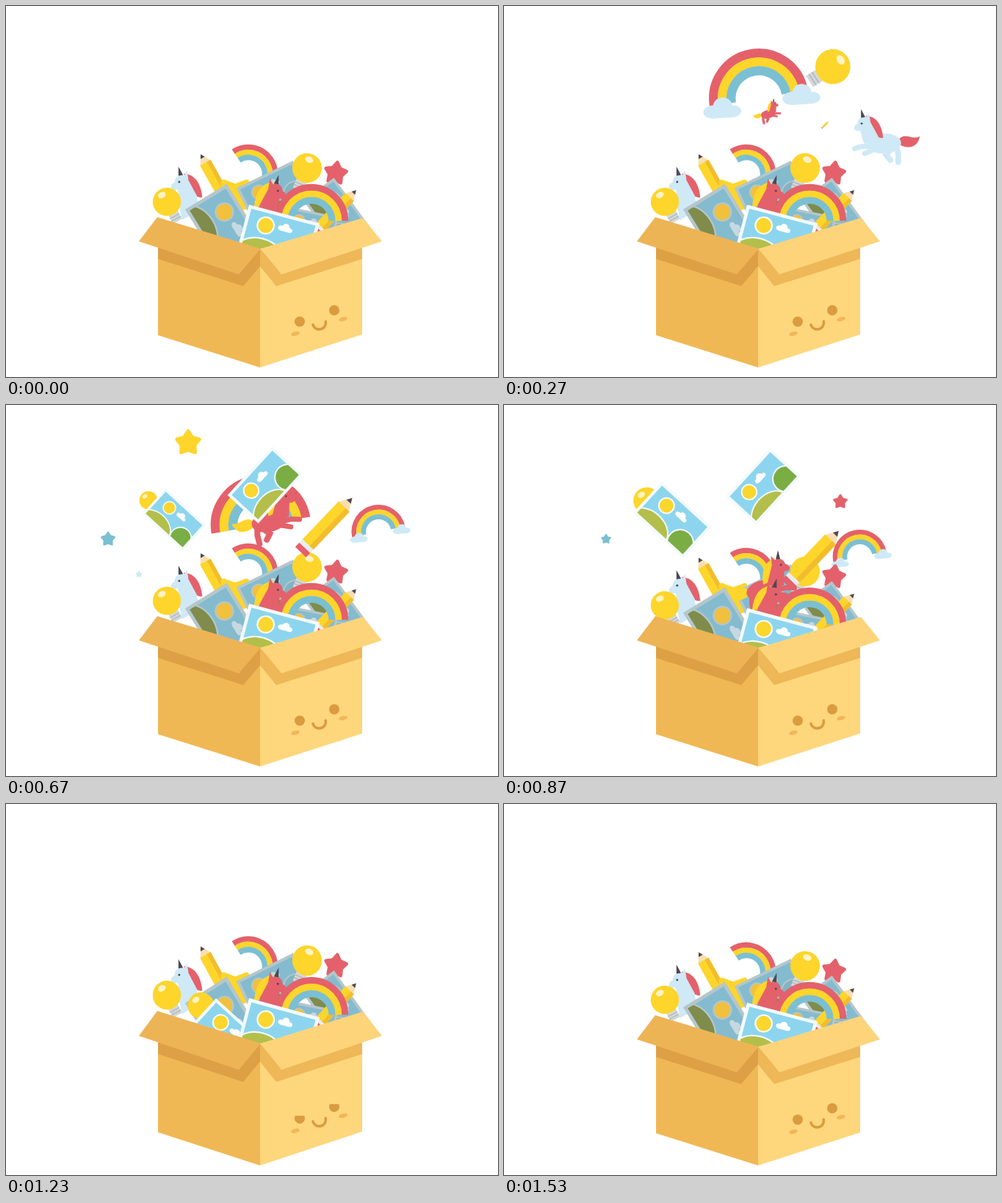
An HTML page with a canvas for the animation above (1560 ms loop, 670 by 506 pixels).

```html
<!DOCTYPE html>
<html lang="en">
<head>
<meta charset="utf-8">
<title>Box of ideas</title>
<style>
  html, body { margin: 0; width: 100%; height: 100%; overflow: hidden; background: #fff; }
  canvas { display: block; }
</style>
</head>
<body>
<canvas id="stage" width="670" height="506"></canvas>
<script>
const ctx = document.getElementById('stage').getContext('2d');
const LOOP = 1560, GROW = 250, FALL = 480;
const MOUTH = { x: 347, y: 316 }, FLOOR = 493;
const RED = '#e4616b', YELLOW = '#fdd52b', BLUE = '#7bbfd3', PALE = '#cfe9f6', DARK = '#4d4a55';
const BRIGHT = { frame: '#f4fafb', sky: '#8dd5ee', sun: '#fbd62c', cloud: '#fff', hill: '#b3bf4a', tree: '#7aae45' };
const DULL = { frame: '#b5c6cb', sky: '#84bbcf', sun: '#f1c03c', cloud: '#c6d9e0', hill: '#7f8c4c', tree: '#84b3c2' };

// ---- drawing helpers ----
function poly(color, ...p) {
  ctx.beginPath();
  for (let i = 0; i < p.length; i += 2) ctx.lineTo(p[i], p[i + 1]);
  ctx.closePath();
  ctx.fillStyle = color;
  ctx.fill();
}

function oval(color, x, y, rx, ry = rx, turn = 0) {
  ctx.beginPath();
  ctx.ellipse(x, y, rx, ry, turn, 0, 7);
  ctx.fillStyle = color;
  ctx.fill();
}

function rect(color, x, y, w, h) {
  ctx.fillStyle = color;
  ctx.fillRect(x, y, w, h);
}

function line(color, width, ...p) {
  ctx.beginPath();
  for (let i = 0; i < p.length; i += 2) ctx.lineTo(p[i], p[i + 1]);
  ctx.lineWidth = width;
  ctx.strokeStyle = color;
  ctx.stroke();
}

function put(draw, x, y, scale = 1, turn = 0) {
  ctx.save();
  ctx.translate(x, y);
  ctx.rotate(turn);
  ctx.scale(scale, scale);
  draw();
  ctx.restore();
}

const mirrored = draw => () => { ctx.scale(-1, 1); draw(); };

// ---- toys ----
function cloud(color = PALE) {
  oval(color, -13, 3, 13, 9);
  oval(color, 1, -4, 13, 12);
  oval(color, 15, 4, 11, 8);
  rect(color, -14, 2, 30, 10);
}

const rainbow = clouds => () => {
  [RED, YELLOW, BLUE].forEach((color, i) => {
    ctx.beginPath();
    ctx.arc(0, 0, 62 - 12 * i, Math.PI, 2 * Math.PI);
    ctx.lineWidth = 12.5;
    ctx.strokeStyle = color;
    ctx.stroke();
  });
  if (clouds > 0) for (const x of [-52, 58]) put(cloud, x, 6, clouds, .1);
};

const star = color => () => {
  ctx.beginPath();
  for (let i = 0; i < 10; i++) {
    const r = i % 2 ? .52 : .88, a = i * Math.PI / 5 - Math.PI / 2;
    ctx.lineTo(r * Math.cos(a), r * Math.sin(a));
  }
  ctx.closePath();
  ctx.lineJoin = 'round';
  ctx.lineWidth = .26;
  ctx.fillStyle = ctx.strokeStyle = color;
  ctx.fill();
  ctx.stroke();
};

function bulb() {
  rect('#d3d9da', -9, 18, 18, 20);
  for (const y of [28, 33]) line('#b4bdc0', 2, -9, y, 9, y);
  oval(YELLOW, 0, 0, 24);
  oval('#fff3c4', -2, -14, 7, 5);
}

function pencil() {
  poly('#f8deb0', 33, -10, 50, 0, 33, 10);
  poly(DARK, 43, -4, 50, 0, 43, 4);
  rect(YELLOW, -36, -10, 70, 20);
  rect('#f2bd2d', -36, 3, 70, 7);
  rect('#e8edef', -42, -10, 6, 20);
  rect(RED, -50, -10, 8, 20);
}

const photo = look => () => {
  const edged = (color, x, y, rx, ry) => {
    oval(look.frame, x, y, rx + 2, ry + 2);
    oval(color, x, y, rx, ry);
  };
  rect(look.frame, -46, -29, 92, 58);
  ctx.beginPath();
  ctx.rect(-42, -25, 84, 50);
  ctx.clip();
  rect(look.sky, -42, -25, 84, 50);
  edged(look.sun, -19, -9, 9.5, 9.5);
  put(() => cloud(look.cloud), 6, -12, .36);
  edged(look.tree, 29, 16, 17, 17);
  edged(look.hill, -18, 30, 30, 21);
};

const head = (coat, mane) => () => {
  ctx.beginPath();
  ctx.moveTo(3, -11);
  ctx.quadraticCurveTo(24, -9, 27, 20);
  ctx.quadraticCurveTo(17, 22, 6, 2);
  ctx.fillStyle = mane;
  ctx.fill();
  poly(coat, -7, 4, 7, -6, 20, 18, 20, 30, 0, 28);
  oval(coat, 0, 0, 9);
  oval(coat, -7, 5, 7, 5, -.4);
  poly(coat, 2, -6, 7, -15, 9, -3);
  poly(DARK, -4, -8, -4, -20, 2, -9);
  oval(DARK, -3, 0, 1.4);
};

const unicorn = (coat, mane) => () => {
  ctx.beginPath();
  ctx.moveTo(22, 2);
  ctx.bezierCurveTo(32, -12, 42, 2, 53, -4);
  ctx.bezierCurveTo(50, 14, 34, 14, 22, 6);
  ctx.fillStyle = mane;
  ctx.fill();
  ctx.lineCap = 'round';
  line(coat, 7, -14, 10, -28, 10, -38, 13);
  line(coat, 7, -10, 14, -24, 20);
  line(coat, 8, 16, 10, 6, 22, 12, 29);
  line(coat, 8, 20, 8, 23, 20, 23, 32);
  oval(coat, 3, 6, 24, 14, -.05);
  put(head(coat, mane), -25, -22);
};

function box(lid) {
  poly('#f0b854', 207, 300, 346, 331, 346, 493, 207, 449);
  poly('#fed67c', 346, 331, 485, 300, 485, 448, 346, 493);
  poly('#dea045', 207, 329, 317, 364, 346, 331, 346, 355, 323, 382, 207, 345);
  poly('#eeb757', 485, 329, 375, 364, 346, 331, 346, 355, 368, 382, 485, 345);
  poly('#edb456', 206, 288, 347, 331, 317, 366, 181, 321);
  poly('#fdd47a', 486, 289, 512, 321, 375, 366, 347, 331);

  const top = Math.asin(lid - 1);
  for (const [x, y] of [[400, 430.5], [447, 415]]) {
    ctx.beginPath();
    ctx.arc(x, y, 7, top, Math.PI - top);
    ctx.fillStyle = '#db9b40';
    ctx.fill();
    oval('#f2b65a', x + (x < 420 ? -6 : 12), y + (x < 420 ? 16.5 : 12), 6, 2.8, -.25);
  }
  ctx.beginPath();
  ctx.arc(426.5, 432, 9, -.2, Math.PI - .3);
  ctx.lineWidth = 3.5;
  ctx.lineCap = 'round';
  ctx.strokeStyle = '#db9b40';
  ctx.stroke();
}

// ---- motion ----
const pulse = (t, from, to) => t > from && t < to ? Math.sin(Math.PI * (t - from) / (to - from)) : 0;

// The box is squashed by the landing toys, then springs back with a dying swing.
function stretchAt(t) {
  const s = t - 930;
  return s < 0 ? 1 : 1 - .055 * Math.exp(-s / 440) * Math.sin(Math.PI * s / 200);
}

function render(t) {
  // A toy grows where it hangs, then drops faster and faster towards the mouth of the box.
  function toss(draw, born, landed, x, y, size, turn) {
    const grown = Math.min(1, (t - born) / GROW);
    const fallen = Math.max(0, 1 - (landed - t) / FALL);
    if (grown <= 0 || fallen > 1.1) return;
    const drop = fallen ** 4;
    put(draw, x + .6 * (MOUTH.x - x) * drop, y + (MOUTH.y - y) * drop, size * (1 - (1 - grown) ** 2), turn);
  }

  function inBox(draw, sink = 7 * pulse(t, 700, 1200)) {
    const stretch = stretchAt(t);
    ctx.save();
    ctx.translate(0, FLOOR * (1 - stretch) + sink);
    ctx.scale(1, stretch);
    draw();
    ctx.restore();
  }

  function twinkle(color, from, to, x, y, size) {
    put(star(color), x, y, size * pulse(t, from, to));
  }

  rect('#fff', 0, 0, 670, 506);

  toss(rainbow(Math.min(1, (520 - t) / 150)), 40, 830, 347, 126, 1, -.17);
  toss(bulb, 40, 640, 448, 82, 1, 1);
  toss(unicorn(PALE, RED), 60, 620, 515, 181, 1, 0);
  toss(rainbow(.85), 400, 1014, 508, 172, .54, -.2);

  inBox(() => {
    put(rainbow(0), 330, 229, .59, .98);
    put(head(PALE, RED), 239, 240, 1.05);
    poly(PALE, 232, 258, 250, 250, 268, 275, 240, 292);
    put(pencil, 285, 238, .82, -2.08);
    put(star(YELLOW), 312, 262, 30, .63);
    put(bulb, 219, 267, .8, -.5);
    put(photo(DULL), 364, 254, .93, -.45);
    put(bulb, 410, 221, .84, .4);
    put(star(RED), 449, 228, 17, .15);
  });

  toss(mirrored(unicorn(RED, YELLOW)), 214, 930, 360, 145, 1, -.25);
  toss(pencil, 255, 995, 437, 162, 1.02, -.81);

  inBox(() => {
    put(photo(DULL), 450, 283, .9, .94);
    put(mirrored(head(RED, YELLOW)), 367, 252, 1.08);
    put(photo(DULL), 300, 305, 1.15, 1.02);
    put(photo(DULL), 412, 303, .8, .2);
    put(pencil, 449, 280, .8, -.8);
    put(rainbow(0), 416, 293, .735);
  });

  toss(photo(BRIGHT), 400, 1200, 353, 109, .98, -.83);
  toss(bulb, 560, 1260, 194, 130, .75, -.6);
  toss(photo(BRIGHT), 530, 1230, 229, 156, 1, .74);

  inBox(() => put(photo(BRIGHT), 371, 314, 1.08, .26));
  inBox(() => box(.5 * pulse(t, 1150, 1310)), 0);

  twinkle(YELLOW, 560, 860, 248, 52 - .3 * (t - 670), 20);
  twinkle(BLUE, 560, 940, 139, 183, 13);
  twinkle(PALE, 570, 710, 181, 231, 6);
  twinkle(RED, 760, 1100, 458, 132, 12);
}

function tick() {
  render(performance.now() % LOOP);
  requestAnimationFrame(tick);
}
tick();
</script>
</body>
</html>
```
